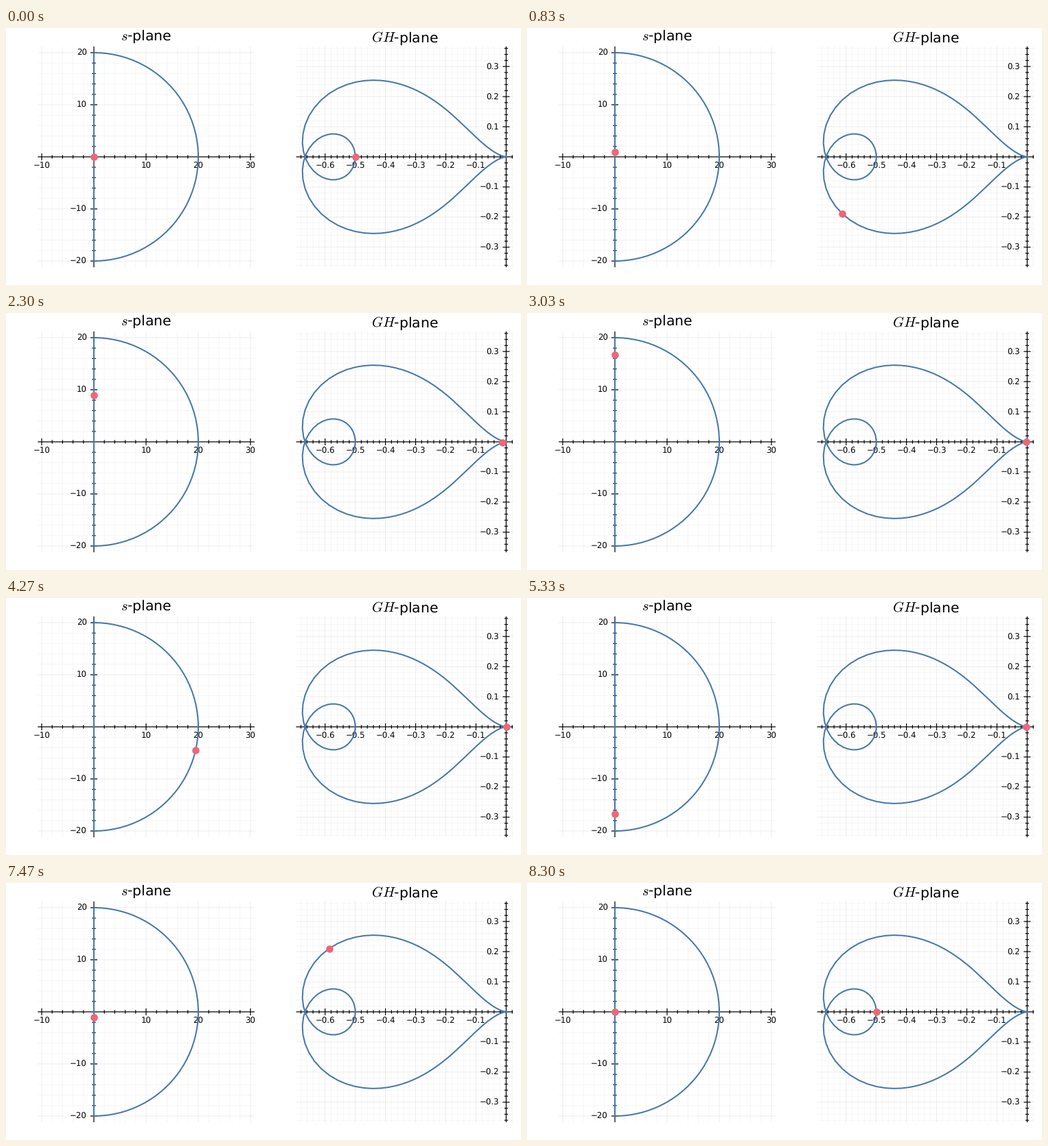
A matplotlib script that plays this animation: 750x375 px, repeating every 8.33 s.

```python
import numpy as np
import matplotlib.pyplot as plt
from matplotlib.animation import FuncAnimation

W, H, DPI = 750, 375, 100
PT = 72 / DPI  # points per pixel
BLUE, RED = "#4477AA", "#EE6677"
STEPS, LOOP_MS = 50, 8330
TOP, BOTTOM = 26.9, 349.1

plt.rcParams.update({
    "font.family": "DejaVu Sans",
    "mathtext.fontset": "cm",
    "text.hinting": "none",
})


def transfer(s):
    return (s - 1) / ((s + 2) * (s**2 - s + 1))


def contour():
    """Closed path round the right half plane, as complex points."""
    def axis(a, b):
        return 1j * np.linspace(a, b, STEPS)

    arc = 20 * np.exp(1j * np.linspace(np.pi / 2, -np.pi / 2, STEPS))
    return np.concatenate([axis(0, 2), axis(2, 20), arc, axis(-20, -2), axis(-2, 0)])


fig = plt.figure(figsize=(W / DPI, H / DPI), dpi=DPI, facecolor="white")
ax = fig.add_axes([0, 0, 1, 1])
ax.set_xlim(0, W)
ax.set_ylim(H, 0)
ax.axis("off")


def segment(x, y, width, **style):
    style = {"color": "black", "solid_capstyle": "butt", **style}
    ax.plot(x, y, lw=width * PT, snap=False, **style)


def label(x, y, text, size, ha):
    ax.text(x, y, text, fontsize=size * PT, ha=ha, va="baseline", zorder=3)


class Plane:
    """Plot area with axes through its origin (x0, y0), in pixels."""

    def __init__(self, x0, y0, scale, left, right, step, fmt):
        self.x0, self.y0, self.scale = x0, y0, scale
        self.left, self.right = left, right
        self.step, self.fmt = step, fmt

    def place(self, z):
        return self.x0 + self.scale * z.real, self.y0 - self.scale * z.imag

    def ticks(self, low, high):
        """Yield (value, is_major) inside the pixel span low..high."""
        minor = self.step / 5
        first = int(np.ceil(low / self.scale / minor))
        last = int(np.floor(high / self.scale / minor))
        for i in range(first, last + 1):
            yield i * minor, i % 5 == 0

    def name(self, v):
        return self.fmt.format(v).replace("-", "\u2212")

    def draw(self):
        for v, major in self.ticks(self.left - self.x0, self.right - self.x0):
            x = self.x0 + v * self.scale
            size = 5 if major else 2.6
            segment([x, x], [TOP, BOTTOM], 0.7, alpha=0.1 if major else 0.05, zorder=1)
            if abs(v) > 1e-9:
                segment([x, x], [self.y0 - size, self.y0 + size], 1.2, zorder=2)
                if major:
                    label(x, self.y0 + 17.3, self.name(v), 11.8, "center")

        for v, major in self.ticks(self.y0 - BOTTOM, self.y0 - TOP):
            y = self.y0 - v * self.scale
            size = 5 if major else 2.6
            segment([self.left, self.right], [y, y], 0.7,
                    alpha=0.1 if major else 0.05, zorder=1)
            if abs(v) > 1e-9:
                segment([self.x0 - size, self.x0 + size], [y, y], 1.2, zorder=2)
                if major:
                    label(self.x0 - 10, y + 4.3, self.name(v), 11.8, "right")

        segment([self.left, self.right], [self.y0, self.y0], 1.2, zorder=2)
        segment([self.x0, self.x0], [TOP, BOTTOM], 1.2, zorder=2)

    def title(self, text, baseline):
        label((self.left + self.right) / 2, baseline, text, 20.4, "center")


s_plane = Plane(128, 188, 7.6, 46.3, 362, 10, "{:.0f}")
gh_plane = Plane(728.4, 188, 439.5, 422.5, 738.3, 0.1, "{:.1f}")
path = contour()
image = transfer(path)

for plane, points in ((s_plane, path), (gh_plane, image)):
    plane.draw()
    segment(*plane.place(points), 2, color=BLUE, zorder=4, solid_joinstyle="round")
s_plane.title("$s$-plane", 18)
gh_plane.title("$GH$-plane", 20.5)

dots, = ax.plot([], [], "o", color=RED, ms=10.6 * PT, mew=0, snap=False, zorder=5)


def update(i):
    spots = s_plane.place(path[i]), gh_plane.place(image[i])
    dots.set_data(*zip(*spots))
    return dots,


anim = FuncAnimation(fig, update, frames=len(path), interval=LOOP_MS / len(path),
                     repeat=True, repeat_delay=0, blit=True)
plt.show()
```
